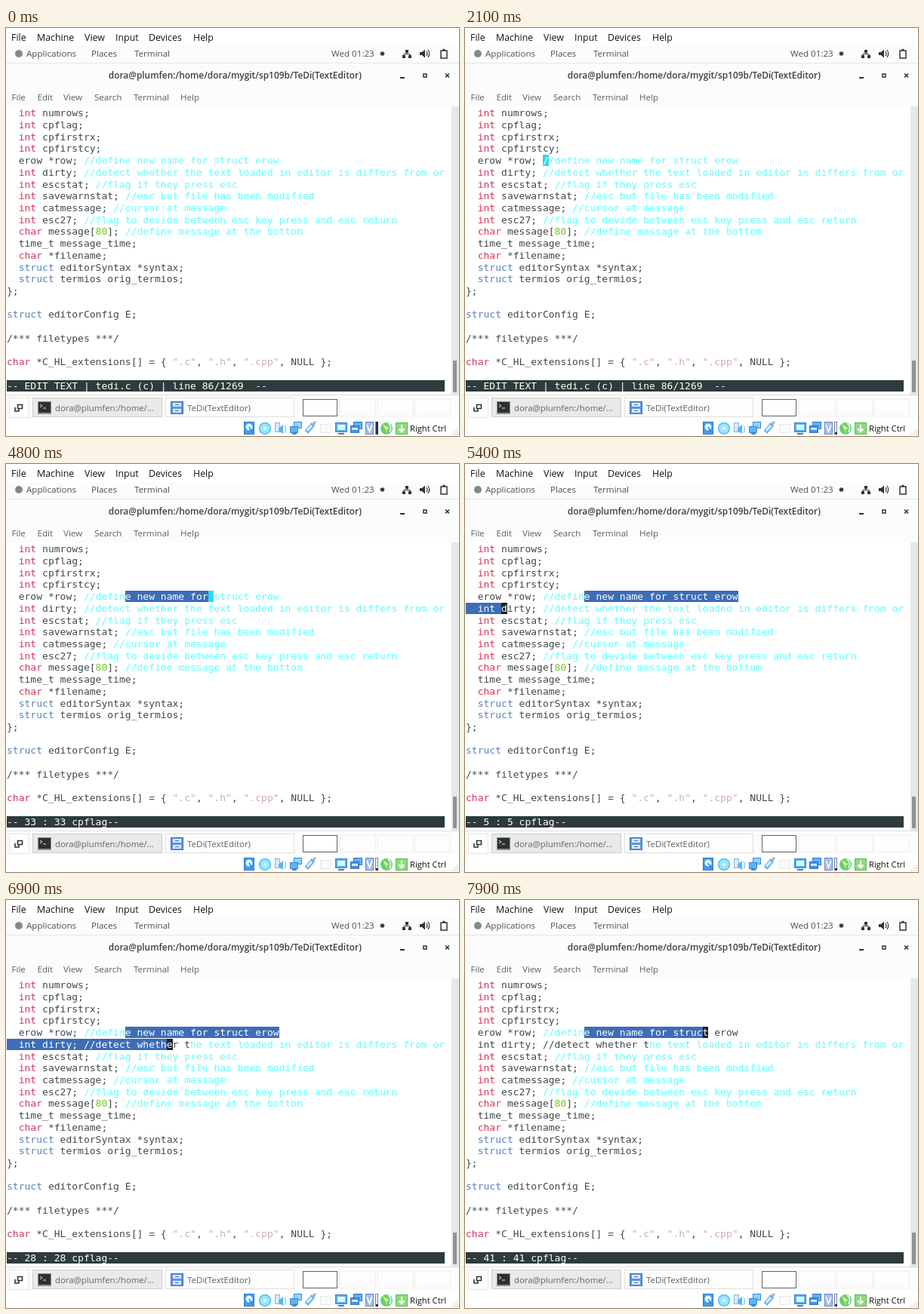
These frames come from a looping animation (600x541 px, 8000 ms). An HTML page with a canvas:

```html
<!DOCTYPE html>
<html lang="en">
<head>
<meta charset="utf-8">
<title>Text editor session</title>
<style>
html, body { margin: 0; width: 100%; height: 100%; overflow: hidden; background: #fff; }
canvas { display: block; }
</style>
</head>
<body>
<canvas id="stage" width="600" height="541"></canvas>
<script>
const ctx = document.getElementById('stage').getContext('2d');
const SANS = '"Open Sans", "Noto Sans", sans-serif';
const DARK = '#42484a', CYAN = '#5cffff', BLUE = '#3d6db5', BLACK = '#1d2123';
const CELL = 7.84, ROW = 15.71, LEFT = 1, TOP = 105.3;
const FIRST = 4, ANCHOR = 20, FAR = 78; // first selected row, selection start, furthest cursor

const lines = `  int numrows;
  int cpflag;
  int cpfirstrx;
  int cpfirstcy;
  erow *row; //define new name for struct erow
  int dirty; //detect whether the text loaded in editor is differs from or
  int escstat; //flag if they press esc
  int savewarnstat; //esc but file has been modified
  int catmessage; //cursor at message
  int esc27; //flag to devide between esc key press and esc return
  char message[80]; //define message at the bottom
  time_t message_time;
  char *filename;
  struct editorSyntax *syntax;
  struct termios orig_termios;
};

struct editorConfig E;

/*** filetypes ***/

char *C_HL_extensions[] = { ".c", ".h", ".cpp", NULL };`.split('\n');
const WRAP = lines[FIRST].length + 1;

const rules = [
  [/^\/\//, CYAN], [/^"/, '#cfacb2'], [/^(int|char)$/, '#d4385a'],
  [/^struct$/, '#5683bb'], [/^\d/, '#76c92c']
];
const colours = lines.map(line => {
  const row = Array(line.length).fill(DARK);
  for (const m of line.matchAll(/\/\/.*|"[^"]*"|\b(?:int|char|struct|\d+)\b/g))
    row.fill(rules.find(r => r[0].test(m[0]))[1], m.index, m.index + m[0].length);
  return row;
});

function box(x, y, w, h, fill, stroke) {
  if (fill) { ctx.fillStyle = fill; ctx.fillRect(x, y, w, h); }
  if (stroke) { ctx.strokeStyle = stroke; ctx.lineWidth = 1; ctx.strokeRect(x + .5, y + .5, w - 1, h - 1); }
}
function disc(x, y, r, fill) {
  ctx.fillStyle = fill;
  ctx.beginPath();
  ctx.arc(x, y, r, 0, 7);
  ctx.fill();
}
function path(d, stroke, width = 1, fill) {
  const p = new Path2D(d);
  if (fill) { ctx.fillStyle = fill; ctx.fill(p); }
  if (stroke) { ctx.strokeStyle = stroke; ctx.lineWidth = width; ctx.stroke(p); }
}
function label(text, x, y, size, fill = '#4a4f51', weight = '', align = 'left') {
  ctx.font = `${weight} ${size}px ${SANS}`;
  ctx.textAlign = align;
  ctx.fillStyle = fill;
  ctx.fillText(text, x, y);
}
function menu(items, y, size, fill) {
  for (const [text, x] of items) label(text, x, y, size, fill);
}
function glyph(ch, row, col, fill) {
  ctx.fillStyle = fill;
  ctx.fillText(ch, LEFT + col * CELL, TOP + row * ROW + 12);
}
function cellBox(row, from, to, fill) {
  const x = Math.round(LEFT + from * CELL), y = Math.round(TOP + row * ROW);
  box(x, y, Math.round(LEFT + to * CELL) - x, 15, fill);
}

function drawTop() {
  box(0, 0, 600, 541, '#fff');
  menu([['File', 7], ['Machine', 41], ['View', 104], ['Input', 145], ['Devices', 189], ['Help', 248]], 16.5, 12.4, '#111');

  box(0, 24, 600, 23, '#fcfcfc');
  disc(17, 34, 5, '#85888a');
  menu([['Applications', 27], ['Places', 113], ['Terminal', 170], ['Wed 01:23', 431]], 38, 11.6);
  disc(498.5, 34, 2.8, '#3a4042');
  // network, speaker, battery
  box(529, 29, 4, 4, '#2e3436');
  box(525, 36, 4, 4, '#2e3436');
  box(533, 36, 4, 4, '#2e3436');
  path('M531 32V34.5M527 36V34.5H535V36', '#2e3436');
  path('M548 32H551L555 28.5V39.5L551 36H548Z', null, 1, '#2e3436');
  path('M557 31Q559 34 557 37M559 29Q562.5 34 559 39', '#2e3436', 1.2);
  path('M576 30H584V40H576ZM578.5 28.5H581.5', '#2e3436', 1.5);

  box(0, 47, 600, 57, '#fcfcfc');
  box(0, 46, 600, 1, '#e6e6e5');
  label('dora@plumfen:/home/dora/mygit/sp109b/TeDi(TextEditor)', 471, 67, 11.9, '#3a4042', '600', 'right');
  box(522, 65, 6, 2, '#2e3436');
  path('M553 61H557V65H553Z', '#2e3436', 1.5);
  path('M582 60.5L587 65.5M587 60.5L582 65.5', '#2e3436', 1.6);
  menu([['File', 7.5], ['Edit', 41.5], ['View', 76], ['Search', 117], ['Terminal', 169], ['Help', 231]], 95.5, 11.6, '#5a5f61');
}

function drawPanel() {
  box(0, 486, 600, 32, '#fcfcfc');
  box(0, 486, 600, 1, '#dededc');
  box(4, 490, 27, 27, '#fdfdfd', '#e6e6e5');
  path('M15.5 499.5H21.5V504.5H15.5Z', '#2e3436', 1.6);
  path('M12 503V508H17V505', '#2e3436', 1.6);
  box(35, 490, 172, 26, '#e9e9e8', '#cfcfcd');
  box(42, 495, 18, 17, '#8b8f90');
  box(43, 496, 16, 14, '#2b3031');
  path('M45 499L48 501L45 503M49 504H53', '#e8e8e8');
  label('dora@plumfen:/home/...', 65, 508, 11.4, '#5f6466');
  box(211, 490, 171, 26, '#fdfdfd', '#e0e0de');
  box(218, 495, 17, 17, '#5c97dd', '#3f74b8');
  for (const y of [497, 505]) {
    box(221, y, 11, 5, '#dbe8f7');
    box(224, y + 2, 5, 1, '#3f74b8');
  }
  label('TeDi(TextEditor)', 240, 508, 11.5, '#5f6466');
  for (const x of [442, 492, 541]) box(x, 492, 48, 23, '#fdfdfd', '#efefee');
  box(393, 492, 46, 23, '#fff', '#5d6365');
}

function drawTray(t) {
  // disk, disc, audio, network
  box(315, 522, 14, 17, '#3f9df0', '#2a78cc');
  disc(322, 529, 4.5, '#e6f6ff');
  path('M322 529L326 536', '#2a78cc', 1.5);
  disc(343, 531, 8.3, '#5cc4f4');
  disc(343, 531, 6.5, '#9be6fb');
  disc(343, 531, 2, '#fff');
  box(356, 523, 7, 13, '#dcecf8', '#7fb2dc');
  path('M361 531L367 526V538L361 534Z', null, 1, '#55b5f2');
  path('M369 527Q372 532 369 537', '#7cccf4', 1.4);
  box(381, 522, 11, 9, '#8fd6f9', '#3c86d4');
  box(376, 528, 11, 9, '#5cb4f4', '#3c86d4');
  box(379, 537, 6, 2, '#3c86d4');
  // stick, folder, display, recording
  path('M398 536L407 525', '#6cb0e8', 6);
  path('M399 534L405 527', '#d8f0fd', 3);
  path('M407 525L410 522', '#a0adb8', 3);
  box(416, 525, 15, 12, '#f9fafa', '#e3e7ea');
  box(436, 523, 16, 13, '#55b0f2', '#3482cc');
  box(439, 526, 10, 7, '#e3f8ff');
  box(440, 537, 8, 2, '#3482cc');
  box(460, 522, 12, 10, '#62b2f0', '#3078c8');
  box(456, 527, 12, 10, '#458fe2', '#3078c8');
  box(458, 530, 8, 3, '#c9ebfc');
  // processor with load bar
  box(476, 522, 11, 17, '#a5c0ea', '#6487c8');
  path('M478 526L481.5 535L485 526', '#fff', 1.6);
  box(489, 522, 4, 17, '#e8edf4', '#7d8796');
  const load = t < 900 ? 17 : 3;
  box(490, 539 - load, 3, load, '#253245');
  // mouse capture, keyboard capture
  disc(504, 531, 8, '#62d07a');
  path('M499 525L508 531L504 532L505 538Z', null, 1, '#f8ec70');
  path('M506 524Q512 529 508 536', '#d4f6fb', 2);
  box(516, 523, 16, 16, '#8edb7c', '#5cb85c');
  path('M524 526V535M520.5 531.5L524 535.5L527.5 531.5', '#fff', 2);
  label('Right Ctrl', 535, 535, 11.2, '#111');
  for (let i = 0; i < 3; i++)
    for (let j = 0; j <= i; j++) box(597 - j * 3, 532 + i * 3, 1.5, 1.5, '#c5c5c5');
}

// Cursor as an offset from the start of the first selected row.
function cursorAt(t) {
  if (t < 1500) return 9;
  if (t < 2100) return 10;
  if (t < 4000) return Math.min(ANCHOR, 13 + 3 * (t - 2100) / 100);
  if (t < 6400) return Math.floor(Math.min(FAR, Math.max(21, 34 + 42 * (t - 4800) / 1300)));
  return Math.floor(Math.min(FAR - 1, 57 - 34 * (t - 7400) / 1000));
}
const colOf = pos => pos >= WRAP ? pos - WRAP : pos;

function statusAt(t, pos) {
  if (t < 3400) return '-- EDIT TEXT | tedi.c (c) | line 86/1269  --';
  if (t < 4000) return 'first cpflag';
  const n = colOf(t < 6400 ? pos - 1 : pos + 1);
  return `-- ${n} : ${n} cpflag--`;
}

function drawTerminal(t) {
  const pos = cursorAt(t), selecting = t >= 4000, back = t >= 6400;
  const shown = t >= 1300 && !(t >= 2900 && t < 3400);
  box(0, 104, 600, 382, '#fff');
  box(590, 104, 10, 382, '#e6e7e6');
  box(592, 441, 5, 42, '#8f9394');
  ctx.font = '13.02px "DejaVu Sans Mono", monospace';
  ctx.textAlign = 'left';

  lines.forEach((line, row) => {
    const start = row === FIRST ? 0 : row === FIRST + 1 ? WRAP : -1;
    if (start >= 0 && selecting) {
      const from = Math.max(0, ANCHOR - start), to = Math.min(line.length, pos - start);
      if (to > from) cellBox(row, from, to, BLUE);
    }
    for (let col = 0; col < line.length; col++) {
      const at = start + col;
      let fill = colours[row][col];
      if (start >= 0) {
        if (selecting && at >= ANCHOR && at < pos) fill = '#fff';
        if (back && at >= pos && at < FAR) fill = DARK;
        if (shown && at === pos) {
          cellBox(row, col, col + 1, fill === CYAN ? '#2adcf0' : fill === DARK ? BLACK : fill);
          fill = fill === CYAN && t >= 3400 ? '#1f86ac' : '#fff';
        }
      }
      if (line[col] !== ' ') glyph(line[col], row, col, fill);
    }
    if (shown && start >= 0 && pos === start + line.length)
      cellBox(row, line.length, line.length + 1, BLACK);
  });

  cellBox(23, 0, 74, '#2e3a3b');
  [...statusAt(t, pos)].forEach((ch, col) => glyph(ch, 23, col, '#fff'));
}

function frame() {
  const t = Math.floor(performance.now() % 8000 / 100) * 100;
  drawTop();
  drawTerminal(t);
  drawPanel();
  drawTray(t);
  requestAnimationFrame(frame);
}
frame();
</script>
</body>
</html>
```
